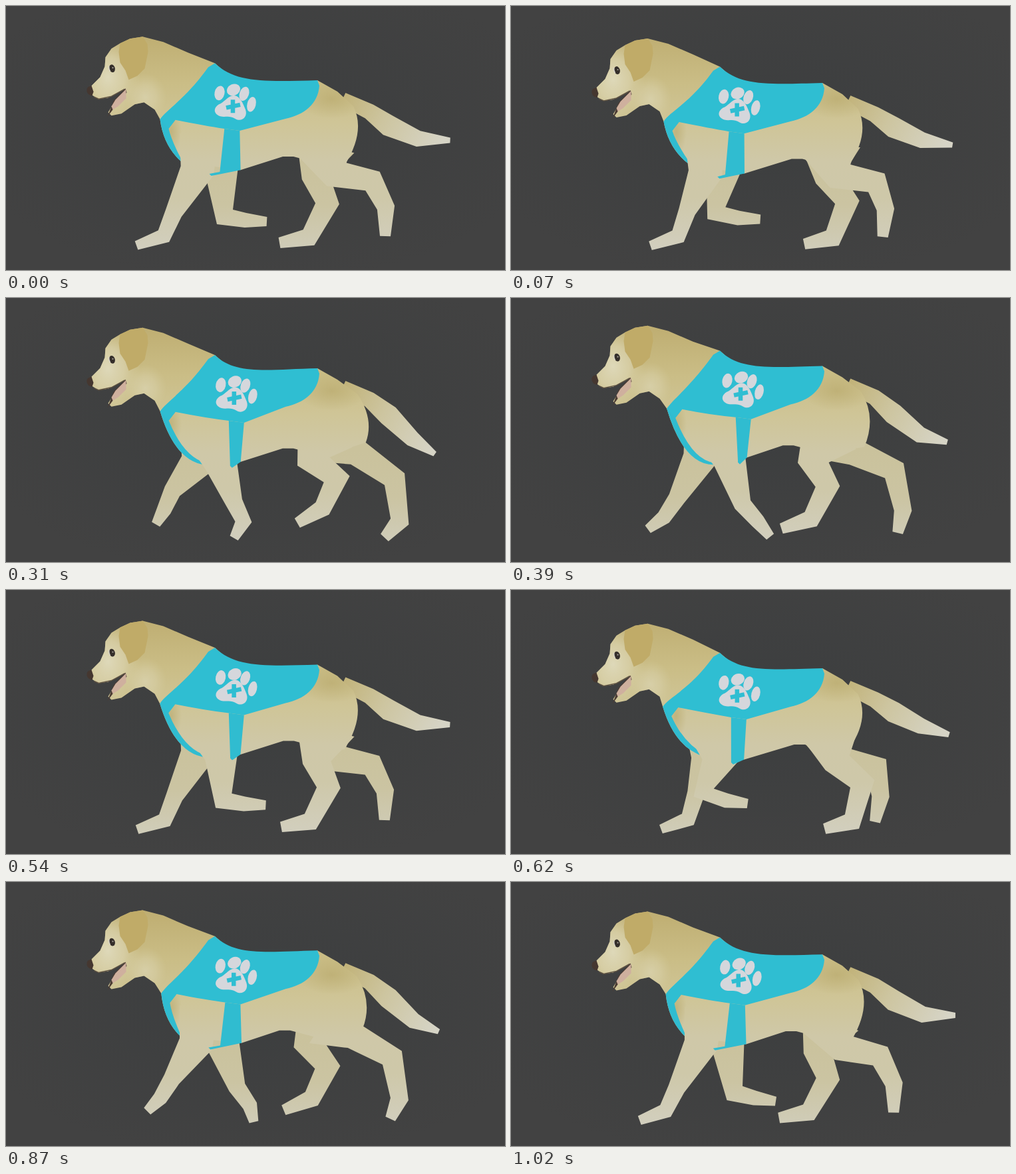
Recreate the animation shown at these times as an HTML page. Size 750 by 398 pixels, loop 1.1 s.

```html
<!DOCTYPE html>
<html lang="en">
<head>
<meta charset="utf-8">
<title>Walking dog</title>
<style>
  html, body { margin: 0; width: 100%; height: 100%; overflow: hidden; background: #404040; }
  svg { display: block; width: 100%; height: 100%; }
</style>
</head>
<body>
<svg viewBox="0 0 750 398" preserveAspectRatio="none">
  <defs>
    <radialGradient id="room" cx=".5" cy=".45" r=".6">
      <stop offset="0" stop-color="#3c3e3f"/><stop offset="1" stop-color="#424242"/>
    </radialGradient>
    <linearGradient id="coat" gradientUnits="userSpaceOnUse" x1="0" y1="45" x2="0" y2="370">
      <stop offset="0" stop-color="#bfae72"/><stop offset=".22" stop-color="#cabd86"/>
      <stop offset=".4" stop-color="#cfc597"/><stop offset=".58" stop-color="#cfc8a8"/>
      <stop offset=".75" stop-color="#cec8a9"/><stop offset="1" stop-color="#d2cfbf"/>
    </linearGradient>
    <linearGradient id="farCoat" gradientUnits="userSpaceOnUse" x1="0" y1="230" x2="0" y2="370">
      <stop offset="0" stop-color="#cac29c"/><stop offset=".5" stop-color="#cbc4a2"/>
      <stop offset="1" stop-color="#d0cdba"/>
    </linearGradient>
    <linearGradient id="tailCoat" gradientUnits="userSpaceOnUse" x1="505" y1="130" x2="650" y2="215">
      <stop offset="0" stop-color="#c1b278"/><stop offset=".45" stop-color="#cdc5a0"/>
      <stop offset="1" stop-color="#d6d4c6"/>
    </linearGradient>
    <radialGradient id="glow">
      <stop offset="0" stop-color="#dfdabc" stop-opacity=".95"/><stop offset=".5" stop-color="#dbd4b0" stop-opacity=".7"/>
      <stop offset="1" stop-color="#d6cea4" stop-opacity="0"/>
    </radialGradient>
    <radialGradient id="shade">
      <stop offset="0" stop-color="#b5a566" stop-opacity=".55"/><stop offset="1" stop-color="#b5a566" stop-opacity="0"/>
    </radialGradient>
    <clipPath id="bodyClip"><path id="bodyEdge"/></clipPath>
  </defs>

  <rect width="750" height="398" fill="url(#room)"/>
  <g fill="url(#farCoat)"><path id="farHind"/><path id="farFront"/></g>
  <path id="tail" fill="url(#tailCoat)"/>
  <path id="body" fill="url(#coat)"/>
  <path id="nearHind" fill="url(#coat)"/>
  <g clip-path="url(#bodyClip)">
    <ellipse cx="490" cy="140" rx="52" ry="30" fill="url(#shade)"/>
    <ellipse cx="248" cy="190" rx="16" ry="36" fill="url(#shade)"/>
    <g class="head">
      <ellipse cx="152" cy="108" rx="48" ry="62" fill="url(#glow)"/>
      <ellipse cx="208" cy="138" rx="32" ry="36" fill="url(#glow)" opacity=".6"/>
    </g>
  </g>
  <path id="band" fill="#30bcd0"/>
  <path id="nearFront" fill="url(#coat)"/>

  <g class="head">
    <path d="M204 47 211 58 212 70 207 95 196 106 183 112 178 98 170 86 168 70 170 57 185 50Z" fill="#c0ab68"/>
    <path d="M178 125 160 144 151 168 156 161 162 153 180 131Z" fill="#4b3b33"/>
    <path d="M179 126 163 142 157 152 159 157 167 152 179 140Z" fill="#cfb09e"/>
    <path d="M131 138 138 141 157 137 177 126" fill="none" stroke="#5e5242" stroke-width="1.5"/>
    <path d="M127 121Q119 122 120 129 121 135 128 136L130 130Z" fill="#453730"/>
    <ellipse cx="158" cy="95" rx="4.300" ry="6" fill="#342e2a" transform="rotate(-15 158 95)"/>
    <path d="M153 91Q153 96 155 99" fill="none" stroke="#d8d5cc" stroke-width="1.400"/>
    <circle cx="159" cy="94" r="1.100" fill="#a9a39b"/>
  </g>

  <path id="panel" fill="#2fbed2"/>
  <path id="strap" fill="#30bcd0"/>
  <g id="paw" fill="#d5d7dc">
    <ellipse cx="321" cy="132" rx="7.500" ry="11" transform="rotate(12 321 132)"/>
    <ellipse cx="342" cy="127" rx="10.500" ry="8.500" transform="rotate(-25 342 127)"/>
    <ellipse cx="358" cy="133" rx="7" ry="11" transform="rotate(20 358 133)"/>
    <ellipse cx="369" cy="149" rx="6.500" ry="11.500" transform="rotate(14 369 149)"/>
    <path d="M340 136C350 133 356 146 360 157 364 168 354 176 345 171 336 165 330 169 322 167 311 163 312 154 320 149 328 146 332 138 340 136Z"/>
    <path d="M341 142V162M331 154 352 149.500" stroke="#2fbed2" stroke-width="6.500"/>
  </g>
</svg>
<script>
const LOOP = 1100;
const HOLDS = [70, 60, 60, 50, 70, 80, 75, 75, 80, 50, 50, 70, 80, 70, 80, 80];
// [clock, gait time]: the stride lingers at its start and then catches up.
const PACE = [[0, 0], [190, 140], [310, 310], [1020, 1070], [LOOP, LOOP]];

// Joint paths over one stride, in eight even steps; the far legs run half a stride later.
const FRONT = {
  wrist: [[252, 312], [293, 305], [337, 307], [348, 312], [329, 318], [272, 299], [252, 289], [249, 304]],
  pastern: [[237, 347], [284, 344], [347, 338], [372, 336], [360, 323], [303, 316], [245, 317], [229, 333]],
  toe: [[196, 361], [246, 360], [322, 362], [395, 358], [392, 325], [331, 324], [239, 338], [203, 350]]
};
const HIND = {
  knee: [[497, 254], [492, 256], [467, 247], [454, 249], [466, 260], [503, 258], [529, 236], [517, 235]],
  hock: [[551, 264], [546, 270], [507, 270], [474, 286], [483, 298], [550, 288], [583, 278], [574, 259]],
  ankle: [[571, 304], [544, 315], [488, 313], [448, 336], [455, 349], [541, 348], [588, 342], [588, 318]],
  toe: [[570, 347], [530, 350], [454, 338], [403, 349], [411, 357], [502, 361], [560, 363], [582, 353]]
};
const HEAD = [[272, 71], [235, 55], [204, 47], [185, 50], [170, 57], [157, 65], [148, 78], [147, 92],
  [140, 108], [127, 121], [128, 135], [137, 141], [152, 139], [178, 126], [159, 150], [152, 161],
  [157, 166], [172, 163], [192, 149], [206, 146], [222, 157]];

const el = id => document.getElementById(id);
const at = ([x, y]) => `${x.toFixed(1)} ${y.toFixed(1)}`;
const line = points => points.map(at).join("L");
const outline = points => `M${line(points)}Z`;
const add = ([x, y], dx, dy) => [x + dx, y + dy];
const unit = ([ax, ay], [bx, by]) => {
  const length = Math.hypot(bx - ax, by - ay);
  return [(bx - ax) / length, (by - ay) / length];
};
const wave = (cycles, phase, shift) => Math.cos(2 * Math.PI * cycles * (phase - shift));

// Closed Catmull-Rom curve through a joint path.
function along(path, phase) {
  const n = path.length, s = ((phase % 1) + 1) % 1 * n, k = Math.floor(s), u = s - k;
  const [a, b, c, d] = [-1, 0, 1, 2].map(step => path[(k + step + n) % n]);
  return [0, 1].map(i => b[i] + u / 2 * (c[i] - a[i]
    + u * (2 * a[i] - 5 * b[i] + 4 * c[i] - d[i] + u * (3 * (b[i] - c[i]) + d[i] - a[i]))));
}

// Outline of a limb from its centre line and half widths, with limited mitres.
function limb(points, widths) {
  const left = [], right = [], last = points.length - 1;
  points.forEach((p, i) => {
    const before = unit(points[Math.max(i - 1, 0)], points[Math.max(i, 1)]);
    const after = unit(points[Math.min(i, last - 1)], points[Math.min(i + 1, last)]);
    const sum = [before[0] + after[0], before[1] + after[1]];
    const size = Math.hypot(...sum), reach = widths[i] * Math.min(2 / size, 1.25) / size;
    left.push(add(p, sum[1] * reach, -sum[0] * reach));
    right.unshift(add(p, -sum[1] * reach, sum[0] * reach));
  });
  return outline([...left, ...right]);
}

const withersBob = phase => 3 + 9 * wave(2, phase, .14);
const rumpBob = phase => -2.5 + 8 * wave(2, phase, .11);
const elbow = phase => [306 - 23 * wave(1, phase, -.1), 247 + .9 * withersBob(phase)];

function frontLeg(phase) {
  const joints = Object.values(FRONT).map(path => along(path, phase));
  return limb([[290, 192 + withersBob(phase)], elbow(phase), ...joints], [29, 25, 13, 11, 7]);
}

function hindLeg(phase) {
  const joints = Object.values(HIND).map(path => along(path, phase));
  return limb([[480, 210 + rumpBob(phase) / 2], ...joints], [45, 20, 16, 13, 8]);
}

function tail(phase) {
  const lift = wave(2, phase, -.02), drop = rumpBob(phase);
  return limb([[506, 141 + drop], [546, 160 + drop], [575, 181 + .6 * drop],
    [615 + 5 * lift, 207 - 7 * lift], [655 + 13 * lift, 221 - 20 * wave(2, phase, -.03)]],
    [10, 12, 16, 12, 4]);
}

function draw(phase) {
  const bob = withersBob(phase), drop = rumpBob(phase), nod = -.5 + 5 * wave(2, phase, .13);
  const [elbowX] = elbow(phase);
  const shapes = {
    nearFront: frontLeg(phase), farFront: frontLeg(phase + .5),
    nearHind: hindLeg(phase), farHind: hindLeg(phase + .5), tail: tail(phase)
  };

  const withers = [314, 85 + bob], rear = [468, 113 + drop];
  const chest = [232 - .4 * bob, 170 + .6 * bob];
  const bandX = elbowX - 23, bandEnd = [bandX, 234 + .45 * (bandX - 262) + .4 * bob];
  const bandBend = [chest[0] + 4 + .5 * (bandX - 262), 209 + bandX - 262];
  const strapLeft = [331 + .18 * (elbowX - 300) - .3 * bob, 184 + .8 * bob];
  const strapRight = add(strapLeft, 23, 3);
  const strapFoot = [353 - .3 * bob, 246 + bob];
  const strapHeel = [strapLeft[0] - 3 + .25 * (elbowX - 303), 249 + .8 * bob];
  const hook = .9 * Math.max(0, 305 - elbowX);

  const flank = [434 + 10 * wave(2, phase, .14), 226 + .7 * bob];
  const hipX = Math.max(along(HIND.knee, phase)[0], along(HIND.knee, phase + .5)[0]);
  const stretch = hipX - 497;
  const buttock = [hipX + 12, 240 - .7 * stretch];
  const head = HEAD.map(p => add(p, 1.5, nod));

  shapes.body = shapes.bodyEdge = `M${line([withers, ...head, chest])}Q${at(bandBend)} ${at(bandEnd)}
    L${line([strapFoot, add(flank, -16, 0), flank, add(flank, 45, 12), buttock])}
    Q${at([541 + .4 * stretch, 190 + drop])} ${at([522 + .2 * stretch, 152 + drop])}
    L${line([[498, 130 + drop], rear, add(rear, -78, 40), add(withers, 46, 40)])}Z`;

  const corner = add(chest, 13, 14), seam = add(chest, 23, 1);
  shapes.band = `M${at(chest)}Q${at(bandBend)} ${at(bandEnd)}L${at(add(bandEnd, 0, -3))}
    Q${at(add(bandBend, 12, -8))} ${at(corner)}L${line([seam, chest])}Z`;
  shapes.panel = `M${at(withers)}C${at(add(withers, 31, 30))} ${at(add(rear, -78, 2))} ${at(rear)}
    L${at(add(rear, 3, 8))}C${at(add(rear, 1, 36))} ${at(add(rear, -20, 52))} ${at(add(rear, -48, 58))}
    L${line([strapRight, strapLeft])}Q${at(add(seam, 45, 9))} ${at(seam)}L${line([corner, chest])}
    C${at(add(chest, 10, -15))} ${at(add(withers, -45, 55))} ${at(add(withers, -10, 6))}Z`;
  shapes.strap = outline([strapLeft, strapHeel, add(strapHeel, -hook, 3), add(strapHeel, -hook + 3, 6),
    strapFoot, strapRight]);

  for (const id in shapes) el(id).setAttribute("d", shapes[id]);
  document.querySelectorAll(".head").forEach(node => node.setAttribute("transform", `translate(1.5 ${nod})`));
  el("paw").setAttribute("transform", `translate(${1 + .05 * (elbowX - 300) - .3 * bob} ${bob - 2})`);
}

// The walk advances in held steps.
function stepStart(time) {
  let start = 0;
  for (const hold of HOLDS) {
    if (time < start + hold) break;
    start += hold;
  }
  return start;
}

function gaitPhase(time) {
  const k = PACE.findIndex(([clock]) => clock > time);
  const [t0, g0] = PACE[k - 1], [t1, g1] = PACE[k];
  return (g0 + (g1 - g0) * (time - t0) / (t1 - t0)) / LOOP;
}

function tick() {
  draw(gaitPhase(stepStart(performance.now() % LOOP)));
  requestAnimationFrame(tick);
}
tick();
</script>
</body>
</html>
```
